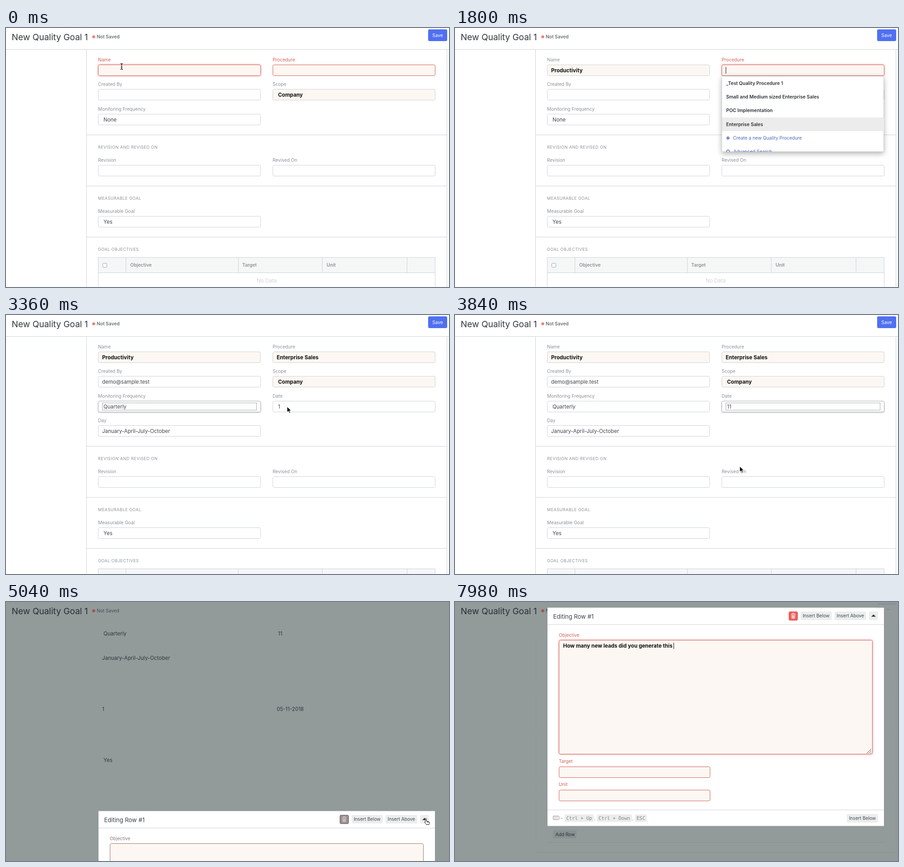
These frames come from a looping animation (977 px wide and 573 px high, 8000 ms). An HTML page:

```html
<!DOCTYPE html>
<html lang="en">
<head>
<meta charset="utf-8">
<title>New Quality Goal</title>
<style>
html, body { margin: 0; width: 100%; height: 100%; overflow: hidden; background: #fff; }
svg { display: block; width: 977px; height: 573px; font-family: Inter, "Open Sans", sans-serif; }
text { white-space: pre; }
.mono { font-family: "DejaVu Sans Mono", monospace; }
.glow { filter: drop-shadow(0 0 2.5px rgba(217, 90, 80, .55)); }
.soft { filter: drop-shadow(0 1px 1.5px rgba(0, 0, 0, .25)); }
.drop { filter: drop-shadow(0 4px 6px rgba(0, 0, 0, .3)); }
</style>
</head>
<body>
<svg id="stage" viewBox="0 0 977 573"></svg>
<script>
const LOOP = 8000;
const stage = document.getElementById('stage');
const GREY = '#8b9296', LINE = '#cdd2d5', RED = '#d75f59', CREAM = '#fcf7f2', INK = '#40474c';
const VEIL = '#929a9a';

const text = (x, y, s, size, fill, weight = 400, extra = '') =>
  `<text x="${x}" y="${y}" font-size="${size}" fill="${fill}" font-weight="${weight}" ${extra}>${s}</text>`;
const rect = (x, y, w, h, fill, stroke = 'none', r = 0, extra = '') =>
  `<rect x="${x}" y="${y}" width="${w}" height="${h}" fill="${fill}" stroke="${stroke}" rx="${r}" ${extra}/>`;
const path = (d, stroke = LINE, fill = 'none', extra = '') =>
  `<path d="${d}" stroke="${stroke}" fill="${fill}" ${extra}/>`;
const clamp = v => Math.max(0, Math.min(1, v));
const ease = v => v * v * (3 - 2 * v);
const ramp = (t, a, b) => ease(clamp((t - a) / (b - a)));
const typed = (s, t, a, b) => s.slice(0, Math.floor(clamp((t - a) / (b - a)) * s.length + 1e-6));
const caretOn = t => (t - 6360 + LOOP * 1060) % 1060 >= 530;

// [start time, focused field]
const FOCUS = [[0, 'name'], [1200, 'proc'], [1920, 'by'], [2520, 'freq'], [3540, 'date'],
  [4020, 'rev'], [4260, 'on'], [4440, '']];
// [time, x, y, pointer shape]
const POINTER = [[0, 255, 85, 'beam'], [180, 255, 85, ''], [3000, 380, 262, 'arrow'], [3320, 620, 203, 'arrow'],
  [3620, 620, 203, 'arrow'], [3840, 628, 335, 'arrow'], [4020, 330, 369, 'beam'], [4200, 330, 369, 'beam'],
  [4380, 680, 369, 'arrow'], [4620, 240, 512, 'hand'], [4740, 240, 512, 'arrow'], [4920, 927, 481, 'hand'],
  [5120, 927, 481, 'arrow'], [5400, 520, 180, 'beam'], [5540, 520, 180, ''], [LOOP, 255, 85, '']];
const OBJECTIVE = 'How many new leads did you generate this ';

const at = (list, t) => list.reduce((a, e) => e[0] <= t ? e : a);

// A labelled input box; o: value, kind, need, focus, caret, ghost
function field(x, y, label, o = {}) {
  const { value = '', need, focus, ghost, caret, select, cream, bold } = o;
  const tx = x + (select ? 12 : 9);
  const ink = bold ? '#111' : ghost ? '#31383a' : INK;
  const val = text(tx, y + 16.6, value, bold ? 11.6 : 11.5, ink, bold ? 700 : 400, caret !== undefined ? 'class="typing"' : '');
  if (ghost) return val;
  const border = need ? RED : focus ? '#aeb4b8' : LINE;
  return text(x, y - 7.5, label, 10.15, need ? RED : GREY) +
    rect(x + .5, y + .5, 358, 24, need || cream ? CREAM : '#fff', border, 3,
      focus ? `class="${need ? 'glow' : 'soft'}"` : '') +
    (select && focus ? rect(x + 9.5, y + 4.5, 340, 16, 'none', '#555', 0, 'stroke-dasharray="1 1"') : '') + val +
    (caret ? `<path class="caret" data-x="${tx}" d="M0 ${y + 5}v15" stroke="#111"/>` : '');
}

function dropdown(t) {
  if (t < 1380 || t >= 1920) return '';
  const pick = Math.min(3, Math.floor((t - 1380) / 110));
  const items = ['_Test Quality Procedure 1', 'Small and Medium sized Enterprise Sales', 'POC Implementation', 'Enterprise Sales'];
  const blue = '#5168b8';
  return rect(588.5, 106.5, 357, 167, '#fff', LINE, 2, 'class="drop"') +
    '<clipPath id="list"><rect x="588" y="106" width="358" height="168"/></clipPath><g clip-path="url(#list)">' +
    rect(589, 107 + pick * 30.3, 357, 30.3, '#ececec') +
    items.map((s, i) => text(598, 125.7 + i * 30.3, s, 10.35, '#2c3236', 600)).join('') +
    path('M598 243.5h8M602 239.5v8', blue, 'none', 'stroke-width="2"') +
    text(613, 247, 'Create a new Quality Procedure', 10.15, blue) +
    path('M605.5 273a3.3 3.3 0 1 1-6.600 0a3.300 3.300 0 1 1 6.600 0M604.500 275.500l3 3', blue, 'none', 'stroke-width="1.5"') +
    text(614, 277, 'Advanced Search', 10.15, blue) + '</g>';
}

const section = (y, title) => path(`M178 ${y + .5}H972`) +
  text(203, y + 31, title, 9, GREY, 400, 'letter-spacing=".5"');

const check = (x, y) => rect(x + .5, y + .5, 9, 9, '#fff', '#9aa0a3', 2);

function table(y, t) {
  const added = t >= 4700;
  const head = [[274, 'Objective'], [521, 'Target'], [707, 'Unit']];
  return rect(203.5, y + .5, 743, 34, '#f5f7f7', LINE) + rect(203.5, y + 34.5, 743, 34, '#fff', LINE) +
    [264, 512, 697, 884].map(x => path(`M${x + .5} ${y}v${added ? 68 : 34}`)).join('') + check(213, y + 13) +
    head.map(([x, s]) => text(x, y + 20.7, s, 10.3, GREY, 600)).join('') +
    (added
      ? check(213, y + 46) + text(238, y + 55.5, '1', 10.15, INK) + path(`M919 ${y + 50}h9l-4.500 5z`, 'none', '#4a5256')
      : text(575, y + 56, 'No Data', 11.5, '#cfd3d5', 400, 'text-anchor="middle"')) +
    rect(216, y + 77, 52, 18, '#edf0f1', 'none', 2) + text(221.500, y + 90, 'Add Row', 10.15, INK) +
    path(`M178 ${y + 126.500}H972`);
}

function form(t, ghost) {
  const focus = at(FOCUS, t)[1];
  const more = t >= 2880, shift = more ? 54 : 0;
  const f = (id, x, y, label, o = {}) => field(x, y, label, { ghost, focus: focus === id, ...o });
  const named = t >= 1200, chosen = t >= 1920;
  const L = 203, R = 588;
  let s = ghost ? '' : path('M177.500 47V2000M972.500 47V2000');
  s += f('name', L, 81, 'Name', { value: typed('Productivity', t, 180, 1080), bold: true, cream: true, need: !named,
    caret: named ? undefined : t > 60 && caretOn(t) }) +
    f('proc', R, 81, 'Procedure', { value: chosen ? 'Enterprise Sales' : '', bold: true, cream: true, need: !chosen,
      caret: named && !chosen ? t < 1260 || t > 1700 || caretOn(t) : undefined }) +
    f('by', L, 135, 'Created By', { value: typed('demo@sample.test', t, 2040, 2400) }) +
    f('scope', R, 135, 'Scope', { value: 'Company', bold: true, cream: true, select: true }) +
    f('freq', L, 190, 'Monitoring Frequency', { value: more ? 'Quarterly' : 'None', select: true });
  if (more) s += f('date', R, 190, 'Date', { value: t < 3600 ? '1' : '11', select: true }) +
    f('day', L, 244, 'Day', { value: 'January-April-July-October' });
  if (!ghost) s += section(236 + shift, 'REVISION AND REVISED ON') + section(349 + shift, 'MEASURABLE GOAL') +
    section(462 + shift, 'GOAL OBJECTIVES') + table(507 + shift, t);
  s += f('rev', L, 303 + shift, 'Revision', { value: t >= 4110 ? '1' : '' }) +
    f('on', R, 303 + shift, 'Revised On', { value: t >= 4380 ? '05-11-2018' : '' }) +
    f('goal', L, 416 + shift, 'Measurable Goal', { value: 'Yes', select: true });
  return s + dropdown(t);
}

function header(ghost, scrolled) {
  return rect(0, 0, 977, 47, ghost ? VEIL : '#fff') + (ghost ? '' : path('M0 47.500H977')) +
    text(12.500, 26.500, 'New Quality Goal 1', 19, ghost ? '#293033' : '#33393d') +
    `<circle cx="193.500" cy="19.500" r="3.300" fill="${ghost ? '#ab4f4d' : '#ec8480'}"/>` +
    text(200, 23.200, 'Not Saved', 10.2, ghost ? '#464e50' : '#687075', ghost ? 400 : 600) +
    (ghost ? scrolled ? path('M934 4.500h38M932 12.500h14M952 16.500h7', '#5265ad', 'none', 'stroke-dasharray="2 2"') : ''
      : rect(931, 3, 42, 26, '#5070f2', 'none', 3) + text(952, 20, 'Save', 10.15, '#fff', 400, 'text-anchor="middle"'));
}

const button = (x, y, w, s, h = 19) => rect(x, y, w, h, '#eceeee', 'none', 3) +
  text(x + w / 2, y + h / 2 + 3.700, s, 10.15, '#41484c', 400, 'text-anchor="middle"');

const key = (x, w, s) => rect(x, 470, w, 16.500, '#ececec', 'none', 3) +
  text(x + 3.500, 482, s, 10.5, '#7c8386', 400, 'class="mono"');

function editor(t, y) {
  const live = t >= 5100, focus = t >= 5480;
  const red = live ? RED : '#a5736f', label = live ? RED : '#827d7e';
  const box = (by, s) => text(229, by - 8.500, s, 10.15, label) + rect(229.500, by + .5, 333, 24, CREAM, red, 3);
  const stroke = live ? '#fff' : '#ded5d5';
  return `<g transform="translate(0 ${y})">` + rect(204, 12.500, 742, 483, '#fff') +
    text(216.500, 36.800, 'Editing Row #1', 13, '#3a4146') + path('M204 50H946') +
    rect(736.500, 21.500, 19, 19, live ? '#ee625c' : '#9b8f91', live ? '#e0544f' : '#615a5c', 2.500) +
    path('M741 27h10M744 26.500v-1.500h4v1.500M742.500 28.500l.5 7.500h6l.5-7.500M744.500 29v6M746 29v6M747.500 29v6', stroke) +
    button(762, 21, 69, 'Insert Below') + button(837, 21, 70, 'Insert Above') + button(913, 21, 20, '') +
    path('M918 32.500h10l-5-5z', 'none', '#333') +
    text(229, 76.700, 'Objective', 10.15, label) +
    rect(229.500, 84.500, 691, 252, CREAM, red, 3, focus ? 'class="glow"' : '') +
    text(238.500, 101, typed(OBJECTIVE, t, 5540, 6360).slice(0, 16) + typed(OBJECTIVE.slice(16), t, 6360, 7960),
      11.6, '#111', 700, focus ? 'class="typing"' : '') +
    (focus && caretOn(t) ? '<path class="caret" data-x="238.500" d="M0 90v14" stroke="#111"/>' : '') +
    path('M908 335l10-10M912 335l6-6M916 335l2-2', '#555') +
    box(364, 'Target') + box(415.500, 'Unit') + path('M204 460H946') +
    rect(216.500, 473.500, 13, 8, '#fff', '#888', 1) +
    path('M218 475.500h10M218 477.500h10M219 479.500h8', '#999', 'none', 'stroke-dasharray="1 1"') +
    text(233, 482, '–', 10.15, GREY) + key(242, 64, 'Ctrl + Up') + text(307, 482, ',', 10.15, GREY) +
    key(313, 77, 'Ctrl + Down') + text(391, 482, ',', 10.15, GREY) + key(397, 26, 'ESC') +
    button(864, 469, 69, 'Insert Below') + rect(216, 505, 52, 18, '#899192', 'none', 2) +
    text(221.500, 518, 'Add Row', 10.15, '#2b3234') + path('M204 532H946M178 554H972', '#858d8e') + '</g>';
}

function pointer(t) {
  const i = POINTER.findLastIndex(p => p[0] <= t);
  const [a, x, y, kind] = POINTER[i], [b, x2, y2] = POINTER[i + 1];
  if (!kind) return '';
  const k = ramp(t, a, b);
  const shape = {
    beam: path('M-3-6.500Q0-6.500 0-4.500Q0-6.500 3-6.500M0-5V5M-3 6.500Q0 6.500 0 4.500Q0 6.500 3 6.500M-2 1.500h4', '#111', 'none', 'stroke-width="1.200"'),
    arrow: path('M0 0V12L3 9.500L5 14L7 13L5 8.800H9Z', '#fff', '#000', 'stroke-width=".8"'),
    hand: path('M-2-1q1.500-2 2.500 0v5l5 1q2 .5 1.500 3l-1 3.500h-6l-3.500-5q-1-2 1.500-1z', '#111', '#fff') + path('M2.500 4v3M4.500 5v2', '#111')
  }[kind];
  return `<g transform="translate(${x + (x2 - x) * k} ${y + (y2 - y) * k})">${shape}</g>`;
}

function draw(t) {
  const ghost = t >= 4980;
  const glide = ramp(t, 5140, 5440) * 450;
  const scroll = ramp(t, 4440, 4580) * 133 + glide;
  stage.innerHTML = rect(0, 0, 977, 573, ghost ? VEIL : '#fff') +
    `<g transform="translate(0 ${-scroll})">${form(t, ghost)}</g>` + header(ghost, glide > 0) +
    (ghost && glide > 0 ? path('M178.500 50V554M972.500 50V554', '#878f90', 'none', 'stroke-dasharray="1 1"') : '') +
    (ghost ? editor(t, 450 - glide) : '') + pointer(t);
  const caret = stage.querySelector('.caret');
  if (caret) {
    const width = stage.querySelector('.typing').getComputedTextLength();
    caret.setAttribute('transform', `translate(${Math.round(+caret.dataset.x + width) + .5} 0)`);
  }
}

const start = performance.now();
let shown = -1;
function tick() {
  const t = Math.floor((performance.now() - start) % LOOP / 20) * 20;
  if (t !== shown) draw(shown = t);
  requestAnimationFrame(tick);
}
draw(0);
tick();
</script>
</body>
</html>
```
